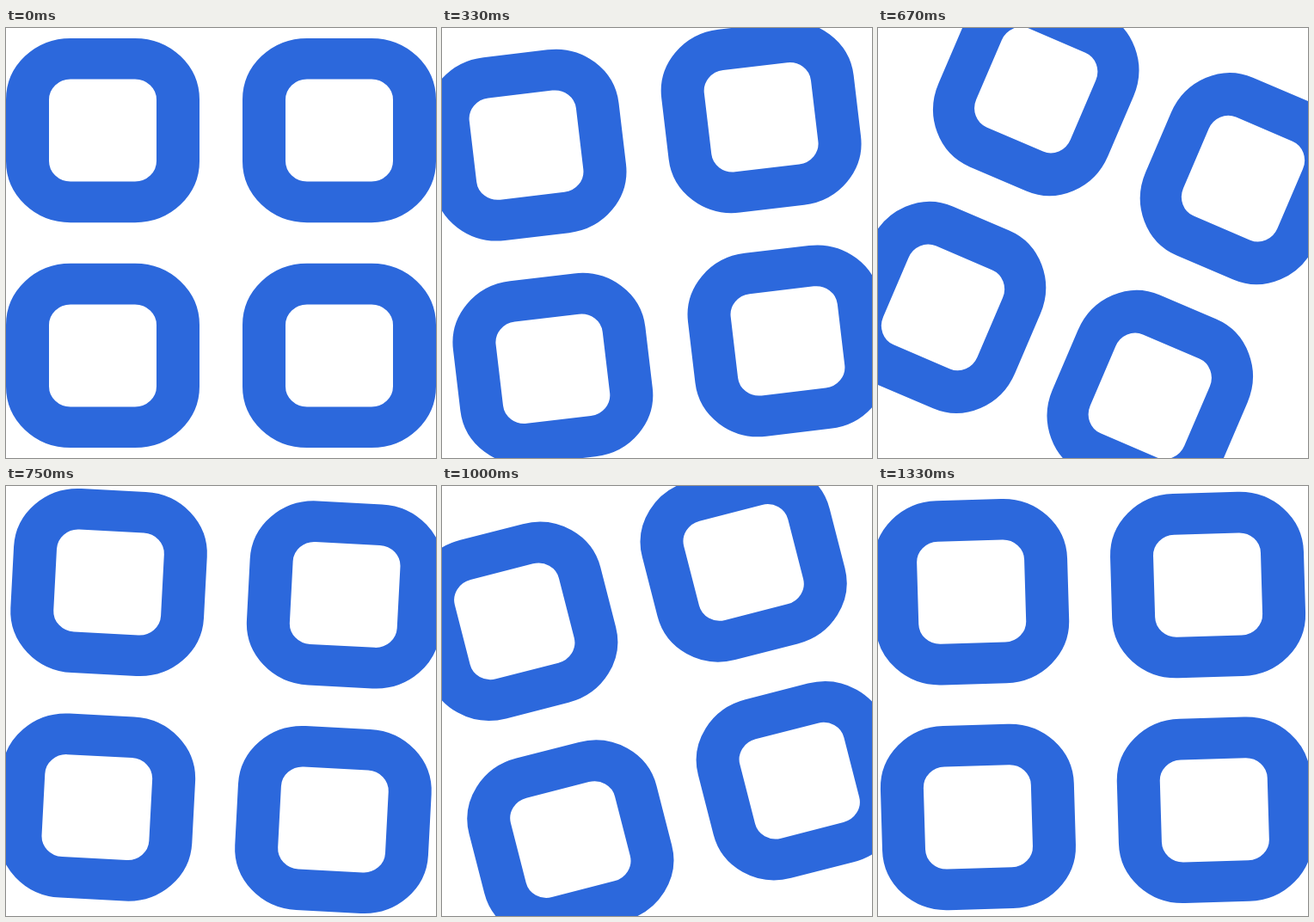
Write an HTML page that moves like this. It is 500 px wide and 500 px high and loops after 1410 ms.

```html
<!DOCTYPE html>
<html lang="en">
<head>
<meta charset="utf-8">
<title>Spinning tiles</title>
<style>
  html, body { margin: 0; width: 100%; height: 100%; overflow: hidden; background: #fff; }
  svg { display: block; width: 100%; height: 100%; }
  rect { fill: none; stroke: #2c68dc; stroke-width: 50; }
</style>
</head>
<body>
<svg viewBox="-250 -250 500 500">
  <g id="tiles">
    <g transform="scale(1 .95238)">
      <rect x="-225" y="-225" width="175" height="175" rx="50"/>
      <rect x="50" y="-225" width="175" height="175" rx="50"/>
      <rect x="-225" y="50" width="175" height="175" rx="50"/>
      <rect x="50" y="50" width="175" height="175" rx="50"/>
    </g>
  </g>
</svg>
<script>
  const LOOP = 1410, STEPS = 17, X1 = 0.6, X2 = 0.53;
  // [step, degrees]: wind up, spin past the full turn, swing back, settle
  const keys = [[0, 0], [3, -10], [13.8, 365], [16, 358.3], [17, 360]];
  const tiles = document.getElementById('tiles');

  // cubic-bezier(X1, 0, X2, 1), solved by bisection
  function ease(x) {
    let lo = 0, hi = 1, u = 0.5;
    for (let n = 0; n < 30; n++) {
      u = (lo + hi) / 2;
      const v = 1 - u;
      const bx = 3 * v * v * u * X1 + 3 * v * u * u * X2 + u * u * u;
      if (bx < x) lo = u; else hi = u;
    }
    return u * u * (3 - 2 * u);
  }

  function angle(step) {
    const n = keys.findIndex(([s]) => s > step);
    const [s0, a0] = keys[n - 1], [s1, a1] = keys[n];
    return a0 + (a1 - a0) * ease((step - s0) / (s1 - s0));
  }

  // 12 steps a second, each starting on a whole hundredth
  const startOf = step => Math.round(step * 25 / 3) * 10;

  function draw(now) {
    const t = now % LOOP;
    let step = STEPS - 1;
    while (step > 0 && startOf(step) > t) step--;
    tiles.setAttribute('transform', `rotate(${angle(step).toFixed(3)})`);
    requestAnimationFrame(draw);
  }
  draw(0);
</script>
</body>
</html>
```
